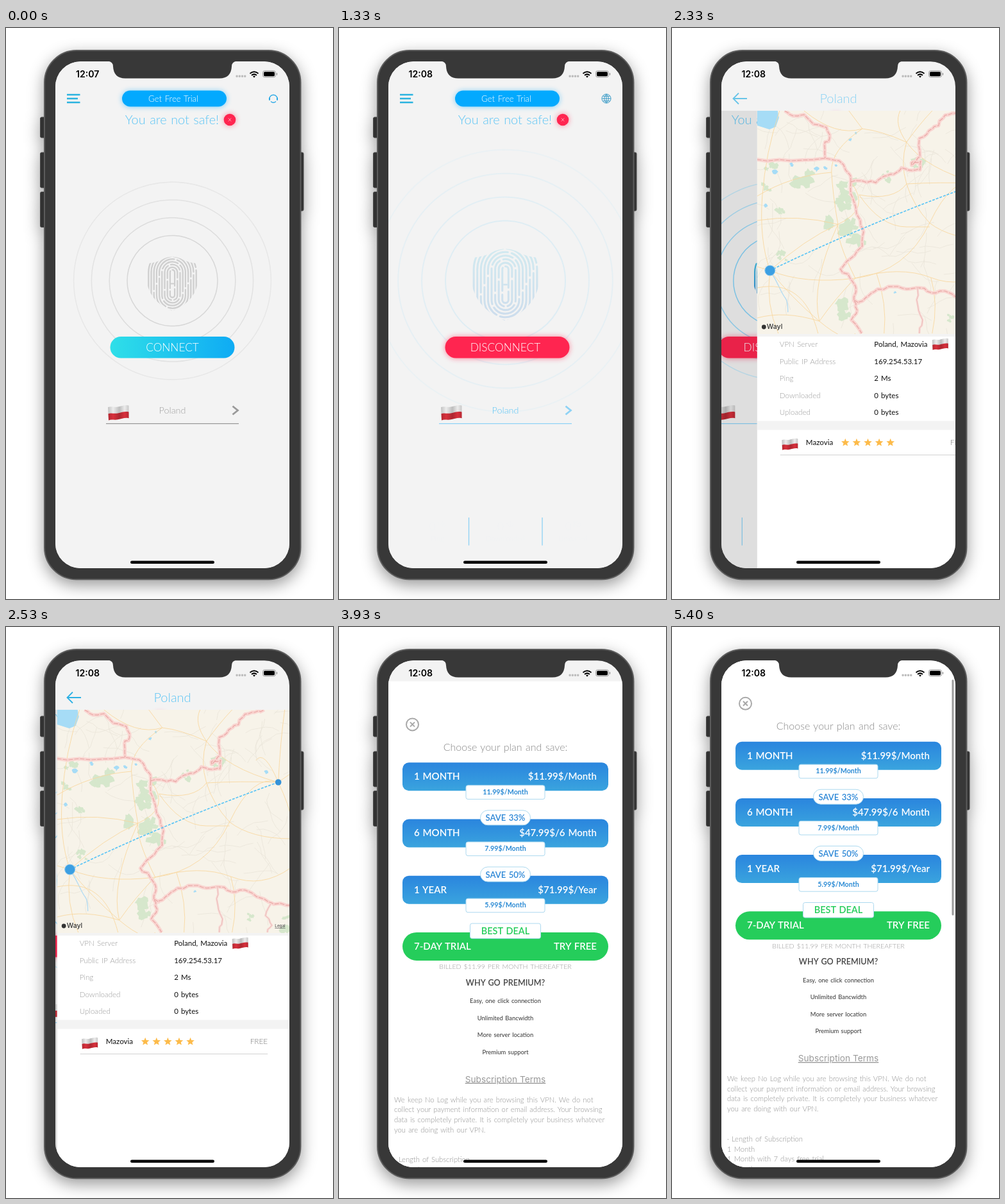
Write an HTML page that moves like this. It is 510x890 px and loops after 5.59 s.

```html
<!DOCTYPE html>
<html lang="en">
<head>
<meta charset="utf-8">
<title>VPN app tour</title>
<style>
html, body { margin: 0; width: 100%; height: 100%; overflow: hidden; background: #fff; }
svg { display: block; width: 510px; height: 890px; font-family: Lato, sans-serif; word-spacing: .07em; }
.ui { font-family: Inter, sans-serif; word-spacing: 0; }
</style>
</head>
<body>
<svg id="stage" viewBox="0 0 510 890"></svg>
<script>
const RED = '#ff2550', SKY = '#5cc5f5', PALE = '#8ed2f5', PAGE = '#f3f3f3';
const LOOP = 5590, STEP = 200 / 3, LAST = 81;

// ---- drawing helpers ----
const rect = (x, y, w, h, r, fill, more = '') =>
  `<rect x="${x}" y="${y}" width="${w}" height="${h}" rx="${r}" fill="${fill}" ${more}/>`;
const circle = (x, y, r, fill, more = '') =>
  `<circle cx="${x}" cy="${y}" r="${r}" fill="${fill}" ${more}/>`;
const line = (d, color, width, more = '') =>
  `<path d="${d}" fill="none" stroke="${color}" stroke-width="${width}" ${more}/>`;
const fillPath = (d, color, more = '') => `<path d="${d}" fill="${color}" ${more}/>`;
const text = (x, y, str, size, color, anchor = 'start', weight = 400, more = '') =>
  `<text x="${x}" y="${y}" font-size="${size}" fill="${color}" text-anchor="${anchor}" font-weight="${weight}" ${more}>${str}</text>`;
const group = (id, body, more = '') => `<g id="${id}" ${more}>${body}</g>`;
const range = n => [...Array(n).keys()];
const grad = (id, a, b, dir) =>
  `<linearGradient id="${id}" x1="0" y1="0" ${dir}><stop stop-color="${a}"/><stop offset="1" stop-color="${b}"/></linearGradient>`;

const CLOTH = 'M0 4C5 2 9 4.500 15 3.500S26 0 32 1.500V21C26 19.500 21 22 15 23S5 22 1 24Z';
const flag = (x, y, w) => `<g transform="translate(${x} ${y}) scale(${w / 32})">` +
  fillPath(CLOTH, '#ececec') +
  fillPath('M.5 14C5 12 9 14.500 15 13.300S26 10 32 11.300V21C26 19.500 21 22 15 23S5 22 1 24Z', '#d8303c') +
  fillPath(CLOTH, 'url(#fold)') + '</g>';

const star = (cx, cy, r) => '<polygon fill="#fdbb4a" points="' + range(10).map(i => {
  const a = i * Math.PI / 5, q = i % 2 ? r * .45 : r;
  return (cx + q * Math.sin(a)).toFixed(1) + ',' + (cy - q * Math.cos(a)).toFixed(1);
}).join(' ') + '"/>';

// ---- home screen ----
function radar(stroke, shades) {
  const rings = shades.map((c, i) => line(
    `M${259.5 - 70.5 - i * 27.8} 394a${70.5 + i * 27.8} ${70.5 + i * 27.8} 0 1 1 0 .01`, c, 1.5)).join('');
  const ridges = range(9).map(i => {
    const w = 3.6 + i * 4.2, h = 21.5 + i * 4.2;
    return rect(259.5 - w, 398.5 - h, w * 2, h * 2, w, 'none',
      `stroke="${stroke}" stroke-width="2.300" stroke-linecap="round" stroke-dasharray="${27 + i * 5} 4.500" stroke-dashoffset="${i * 11}"`);
  }).join('');
  return rings + `<g clip-path="url(#shield)">${ridges}${line('M257 398.500h5', stroke, 2)}</g>`;
}

function pill(x, fill, label, glow) {
  return (glow ? rect(x, 481, 194, 34, 17, fill, 'filter="url(#glow)" opacity=".55"') : '') +
    rect(x, 481, 194, 33.5, 16.7, fill) + text(259.5, 503.5, label, 17.3, '#fff', 'middle', 300);
}

const place = (label, mark) => text(259.5, 601, 'Poland', 14.4, label, 'middle', 300) +
  line('M353.500 589.500L361.500 596L353.500 602.500', mark, 2.8) + line('M156 616.700H363', mark, 1.2);

const stat = (x, unit, label, mid) => text(x, 783, '0', 17.5, SKY, 'start', 300) +
  text(x + 12.5, 777, unit, 10.7, SKY, 'start', 300) + text(mid, 800, label, 11, SKY, 'middle', 300);

const home = rect(77, 52, 365, 790, 0, PAGE) +
  text(259, 149.5, 'You are not safe!', 19.9, SKY, 'middle', 300) +
  circle(349, 143, 9.5, RED, 'filter="url(#glow)" opacity=".5"') + circle(349, 143, 9.3, RED) +
  line('M346.800 140.500l4.400 5m0-5l-4.400 5', '#ffb3c2', .8) +
  group('off', radar('#cfcfcf', ['#d7d7d7', '#dddddd', '#e2e2e2', '#e7e7e7']) +
    pill(162.5, 'url(#aqua)', 'CONNECT') + place('#a0a0a0', '#999')) +
  group('on', group('radar', radar('url(#ink)', ['#86d3f8', '#9adaf8', '#afe1f8', '#c6e9f8'])) +
    pill(165.5, RED, 'DISCONNECT', true) + place(SKY, PALE) +
    line('M202.500 763V806.500M317 763V806.500', PALE, 1.3) +
    group('stats', stat(140.5, 'Ms', 'Ping', 153.5) + stat(247, 'Kb', 'Downloaded', 259.5) + stat(352.5, 'Kb', 'Uploaded', 365))) +
  flag(159, 587, 32.5);

const homeBar = line('M95 104H115.500M95 110H112M95 116H115.500', '#2bb3df', 2.5) +
  rect(181, 98, 163, 25, 12.5, '#03a9fe', 'filter="url(#glow)" opacity=".5"') +
  rect(181, 97.5, 163, 25, 12.5, '#03a9fe') +
  text(261, 115, 'Get Free Trial', 13.2, '#fff', 'middle', 300) +
  group('help', line('M411 112.500a6.300 6.300 0 1 1 12 0M413 114.500q4 3.500 8 0', '#2ba9e6', 1.4) +
    line('M411 108.500v4M423 108.500v4', '#2ba9e6', 2)) +
  group('globe', line('M410 110a7 7 0 1 1 0 .01M410 110h14M417 103v14M411.500 106.300h11M411.500 113.700h11M417 103q-7 7 0 14q7-7 0-14', '#3b9bc6', 1));

// ---- map ----
let seed = 7;
const rnd = () => (seed = seed * 16807 % 2147483647) / 2147483647;

function lanes() {
  let d = '';
  for (let i = 0; i < 110; i++) {
    let x = 77 + rnd() * 365, y = 129 + rnd() * 348, a = rnd() * 6.3;
    d += `M${x.toFixed(0)} ${y.toFixed(0)}`;
    for (let j = 0; j < 5; j++) {
      a += rnd() - .5;
      x += 11 * Math.cos(a); y += 11 * Math.sin(a);
      d += `L${x.toFixed(0)} ${y.toFixed(0)}`;
    }
  }
  return line(d, '#eae5da', .8);
}

function blob(x, y, r, color) {
  const pts = range(11).map(i => {
    const q = r * (.45 + rnd() * .75), a = i * .571;
    return (x + q * 1.15 * Math.cos(a)).toFixed(1) + ',' + (y + q * Math.sin(a)).toFixed(1);
  });
  return `<polygon points="${pts.join(' ')}" fill="${color}"/>`;
}

// a wood is a loose cluster of small patches
const wood = ([x, y, r]) => range(5).map(() =>
  blob(x + (rnd() - .5) * r * 1.7, y + (rnd() - .5) * r * 1.7, r * (.25 + rnd() * .35), '#d6e7cc')).join('');

// adds small wiggles between border points
function wiggle(str) {
  const p = str.split(' ').map(s => s.split(',').map(Number));
  let d = 'M' + p[0];
  for (let i = 1; i < p.length; i++) {
    const [ax, ay] = p[i - 1], [bx, by] = p[i];
    for (let k = 1; k < 3; k++)
      d += `L${(ax + (bx - ax) * k / 3 + rnd() * 4 - 2).toFixed(1)} ${(ay + (by - ay) * k / 3 + rnd() * 4 - 2).toFixed(1)}`;
    d += 'L' + p[i];
  }
  return d;
}

const borders = [
  '77,205 130,207 183,203 205,207 221,228 223,240',
  '120,129 133,137 150,135 165,150 185,155 190,172 182,182 183,203',
  '223,240 240,238 262,241 275,231 290,228 302,218 318,222 331,221 332,208 321,208 318,214 331,200 330,172 345,160 360,152 370,136 385,133 400,129',
  '223,240 226,265 238,300 243,318 241,340 222,360 207,376 222,390 231,405 228,425 233,440 224,455 240,476',
  '228,425 236,427 250,418 265,407 290,403 310,407 330,405 350,413 370,410 400,424 415,432 442,434'
].map(wiggle).join('');
const minor = ['327,405 328,435 335,455 330,476', '410,432 402,450 412,465 405,476'].map(wiggle).join('');

const roads = 'M97 378Q150 330 203 306T223 240M97 378Q150 400 230 390T346 304T422 242M97 378Q130 420 174 457T230 476' +
  'M97 378Q80 330 85 262T112 129M97 378Q90 430 110 476M97 378L77 372M203 306Q195 260 193 225T241 157M241 157Q270 160 310 178' +
  'M310 178Q340 220 422 242M310 178Q300 210 310 243T346 304M310 178Q330 150 350 129M310 178Q290 150 300 129M241 157L220 129M241 157Q200 170 150 129' +
  'M422 242Q400 190 387 208M422 242Q440 280 442 300M422 242Q425 180 432 129M422 242L442 228M230 390Q300 370 348 389T442 375M230 390Q200 330 203 306' +
  'M203 306Q140 290 77 300M193 225Q130 230 77 262M174 457Q200 420 230 390M174 457Q120 440 77 452M236 260Q290 270 310 243M236 260Q270 310 310 310H346' +
  'M346 304Q380 330 442 330M348 389Q360 430 350 476M263 382Q280 430 275 476M174 457Q160 400 203 306M310 243Q360 240 422 242M77 405Q150 390 172 476';

const woods = [[214, 243, 17], [199, 266, 20], [222, 272, 13], [146, 247, 18], [162, 232, 10], [225, 326, 20], [187, 296, 14], [112, 282, 9],
  [99, 218, 9], [92, 246, 8], [211, 440, 16], [228, 306, 11], [432, 462, 14], [330, 213, 10], [117, 355, 9], [282, 230, 9], [380, 452, 6]];
const lakes = [[105, 224, 4], [131, 213, 3], [170, 220, 4], [183, 218, 3], [222, 174, 2.5], [200, 214, 2], [231, 164, 2], [403, 226, 3], [292, 412, 2], [90, 277, 3]];

// x, y of the marker, name, text offset, size
const towns = [[241, 157, 'Kaunas', 2, -1, 8], [309, 177, 'Vilnius', 2, 6, 8], [213, 186, 'Marijampolė', 2, 0, 6.6], [248, 200, 'Alytus', 2, -1, 6.6],
  [193, 225, 'Suwałki', 2, -1, 6.6], [310, 243, 'Lida', 2, 0, 6.6], [387, 207, 'Maladzyechna', 1, -1, 7.2], [418, 239, 'Minsk', 2, -2, 8],
  [236, 261, 'Hrodna', -32, -2, 8], [204, 307, 'Białystok', -41, 7, 8], [311, 310, 'Slonim', 2, -1, 6.6], [346, 306, 'Baranavichy', 2, -1, 7.2],
  [422, 316, 'Slutsk', 2, 5, 6.6], [420, 334, 'Salihorsk', 2, -2, 7.2], [230, 391, 'Brest', 2, 7, 8], [263, 382, 'Kobrin', 2, 5, 6.6],
  [348, 389, 'Pinsk', 2, 6, 7.2], [174, 459, 'Lublin', 2, -2, 8], [220, 468, 'Chełm', 2, -1, 6.6], [97, 376, 'Warsaw', 3, 1, 8]];
const halo = 'paint-order="stroke" stroke="#f9f5ec" stroke-width="1.800"';
const labels = towns.map(([x, y, name, dx, dy, size]) =>
  circle(x, y, 2, '#fff', 'stroke="#555" stroke-width="1"') + text(x + dx, y + dy, name, size, '#444', 'start', 500, halo)).join('') +
  text(79, 177, 'KALININGRAD', 8.3, '#777', 'start', 500, 'letter-spacing="1.100" ' + halo) +
  text(412, 284, 'BELARUS', 9, '#444', 'start', 600, 'letter-spacing="2" ' + halo) +
  text(74, 259, 'Olsztyn', 7.8, '#555', 'start', 500, halo) +
  circle(184, 272, 4.5, '#35a05a') + circle(184, 272, 1.6, '#fff') +
  text(184, 283, 'Biebrza', 6.3, '#35a05a', 'middle', 500, halo) + text(184, 290, 'National Park', 6.3, '#35a05a', 'middle', 500, halo);

const map = rect(77, 129, 365, 348, 0, '#f7f3e9') + lanes() +
  woods.map(wood).join('') + lakes.map(g => blob(...g, '#a6dcf6')).join('') +
  fillPath('M77 129H109L111 140L106 154L96 158L77 152Z', '#a6dcf6') +
  line('M97 378q8 12 14 25t10 18t4 22', '#b5dcf2', 1.4) +
  line(roads, '#f9d9a2', .9) +
  line(borders, '#f9d5d1', 5.5, 'stroke-linejoin="round"') + line(borders, '#e8a5a2', 1.1, 'stroke-dasharray="7 2"') +
  line(minor, '#f9dcd8', 3.5) + line(minor, '#e5b0ac', .8) +
  group('labels', labels, 'class="ui"') +
  line('M97 378Q255 302 422 242', SKY, 1.7, 'stroke-dasharray="4 2"') +
  circle(97, 378, 8, '#3b9fe2', 'stroke="#8cc8ee" stroke-width="1"') + circle(422, 242, 4.8, '#3492d8') +
  circle(87.5, 466, 3.4, '#333') +
  text(92, 469, 'Wayl', 10.5, '#333', 'start', 500, 'class="ui"') +
  text(433, 468, 'Legal', 6.3, '#555', 'end', 500, 'class="ui" text-decoration="underline"');

const facts = [['VPN Server', 'Poland, Mazovia'], ['Public IP Address', '169.254.53.17'], ['Ping', '2 Ms'], ['Downloaded', '0 bytes'], ['Uploaded', '0 bytes']];
const server = rect(77, 129, 365, 713, 0, '#fff') + `<g clip-path="url(#mapBox)">${map}</g>` +
  rect(77, 477, 365, 4, 0, PAGE) + rect(77, 612.5, 365, 14, 0, PAGE) +
  facts.map(([k, v], i) => text(112, 497.3 + i * 26.5, k, 11.6, '#9a9a9a', 'start', 300) + text(259.5, 497.3 + i * 26.5, v, 11.5, '#111')).join('') +
  flag(350, 483, 25) + flag(115.5, 639, 25) +
  text(153, 650, 'Mazovia', 11.6, '#111') + range(5).map(i => star(214.5 + i * 17.6, 646.3, 6.6)).join('') +
  text(405.5, 650, 'FREE', 11.8, '#777', 'end', 300) + line('M113 665.500H405.500', '#d2d2d2', 1);
const serverBar = line('M117 110H95.500M104 101.500L95.500 110L104 118.500', '#2ab0e4', 1.8) +
  text(259.5, 117, 'Poland', 20, SKY, 'middle', 300);

// ---- plans ----
const box = (x, y, w, h, r) => rect(x, y, w, h, r, '#fff', 'stroke="#acd9ef" stroke-width="1"');
const mid = (y, str, size, color, weight = 400) => text(259.5, y, str, size, color, 'middle', weight);
const ends = (y, a, b) => text(117, y, a, 15, '#fff', 'start', 600) + text(402, y, b, 15, '#fff', 'end', 600);
const plans = [['1 MONTH', '$11.99$/Month', '11.99$/Month'], ['6 MONTH', '$47.99$/6 Month', '7.99$/Month', 'SAVE 33%'], ['1 YEAR', '$71.99$/Year', '5.99$/Month', 'SAVE 50%']];
const plan = ([name, price, rate, save], i) => {
  const y = 178.7 + i * 88.2;
  return rect(99, y, 321, 44, 10, 'url(#deep)') + ends(y + 27, name, price) +
    box(198, y + 35.5, 123, 21.6, 3) + mid(y + 49.7, rate, 10.7, '#2a8ad4', 700) +
    (save ? box(220.5, y - 13.7, 78, 23, 11.5) + mid(y + 2.9, save, 13.1, '#2a86d6', 600) : '');
};
const prose = ['We keep No Log while you are browsing this VPN. We do not', 'collect your payment information or email address. Your browsing',
  'data is completely private. It is completely your business whatever', 'you are doing with our VPN.', '', '',
  '· Length of Subscription', '1 Month', '1 Month with 7 days free trial', '6 Month'];
const offer = rect(77, 52, 365, 800, 0, '#fff') +
  circle(114.5, 119.3, 9.5, 'none', 'stroke="#a8a8a8" stroke-width="2"') + line('M111 115.800l7 7m0-7l-7 7', '#a8a8a8', 2) +
  mid(160, 'Choose your plan and save:', 16, '#888', 300) + plans.map(plan).join('') +
  rect(99, 443.3, 321, 44, 22, '#25cd5b') + ends(470, '7-DAY TRIAL', 'TRY FREE') +
  box(204.5, 429.5, 110, 23.5, 3) + mid(446, 'BEST DEAL', 14.5, '#25cd5b', 600) +
  mid(500.8, 'BILLED $11.99 PER MONTH THEREAFTER', 10.6, '#999', 300) + mid(526, 'WHY GO PREMIUM?', 12.6, '#444', 600) +
  ['Easy, one click connection', 'Unlimited Bancwidth', 'More server location', 'Premium support'].map((s, i) => mid(553.8 + i * 26.5, s, 9.4, '#333')).join('') +
  text(259.5, 677, 'Subscription Terms', 13.7, '#999', 'middle', 400, 'class="ui" text-decoration="underline"') +
  prose.map((s, i) => text(86, 708 + i * 15.65, s, 11.25, '#909090', 'start', 300)).join('');

// ---- phone ----
const status = text(127.3, 77, '', 14.1, '#000', 'middle', 600, 'class="ui" id="clock"') +
  range(4).map(i => rect(358.5 + i * 4.2, 73.5, 3.2, 3.2, 1, '#bbb')).join('') +
  line('M380.500 71q6.500-5.500 13 0M383 73.700q4-3.200 8 0', '#000', 2) + fillPath('M385 75.200q2-1.500 4 0l-2 2.300Z', '#000') +
  rect(400.5, 66.7, 20, 10, 3, 'none', 'stroke="#999" stroke-width="1"') + rect(402, 68.2, 17, 7, 1.6, '#000') + rect(421.8, 70, 1.4, 3.6, .7, '#999');
const keys = [[53.5, 139, 32], [53.5, 194, 55], [53.5, 255.5, 55], [456, 194, 91]]
  .map(([x, y, h]) => rect(x, y, 8, h, 2, '#303030', 'stroke="#4c4c4c" stroke-width="1"')).join('');
const notch = fillPath('M159 51.500Q167 52.500 167 60Q168 78.500 186 78.500H333Q351 78.500 352 60Q352 52.500 360 51.500Z', '#383838');

const stage = document.getElementById('stage');
stage.innerHTML = '<defs>' +
  grad('aqua', '#2fdfe8', '#0fabf4', 'x2="1" y2="0"') + grad('deep', '#2a85de', '#3aa4de', 'x2="0" y2="1"') +
  '<linearGradient id="ink" gradientUnits="userSpaceOnUse" x1="0" y1="357" x2="0" y2="440"><stop stop-color="#45c4e4"/><stop offset="1" stop-color="#2b7fd2"/></linearGradient>' +
  '<linearGradient id="fold"><stop stop-opacity=".18"/><stop offset=".25" stop-opacity="0"/><stop offset=".55" stop-opacity=".2"/><stop offset=".8" stop-opacity="0"/><stop offset="1" stop-opacity=".15"/></linearGradient>' +
  '<filter id="glow" x="-50%" y="-100%" width="200%" height="300%"><feGaussianBlur stdDeviation="4"/></filter>' +
  '<filter id="drop" x="-20%" y="-10%" width="140%" height="125%"><feDropShadow dx="0" dy="8" stdDeviation="12" flood-opacity=".4"/></filter>' +
  '<clipPath id="screen"><rect x="77" y="52.300" width="365" height="789.700" rx="39"/></clipPath>' +
  '<clipPath id="mapBox"><rect x="77" y="129" width="365" height="348"/></clipPath>' +
  '<clipPath id="shield"><path d="M219 367Q236 366 247 359Q259.500 354 272 359Q283 366 300 367V388Q299 425 259.500 441Q220 425 219 388Z"/></clipPath></defs>' +
  `<g filter="url(#drop)">${keys}${rect(60, 35, 399.5, 824.5, 50, '#383838', 'stroke="#5c5c5c" stroke-width="2"')}</g>` +
  '<g clip-path="url(#screen)">' + rect(77, 52, 365, 790, 0, PAGE) +
  group('home', home) + rect(77, 129, 365, 713, 0, '#000', 'id="dim"') + group('server', server) +
  group('homeBar', homeBar) + group('serverBar', serverBar) +
  group('offer', offer) + rect(436.5, 82, 3, 367.500, 1.5, '#9b9b9b', 'id="thumb"') +
  status + rect(194, 830.4, 131, 4.6, 2.3, '#000') + '</g>' + notch;

// ---- motion ----
const el = Object.fromEntries([...stage.querySelectorAll('[id]')].map(n => [n.id, n]));
const fade = (id, v) => el[id].setAttribute('opacity', v);
const move = (id, x, y) => el[id].setAttribute('transform', `translate(${x} ${y})`);
const ramp = (t, a, b) => Math.min(1, Math.max(0, (t - a) / (b - a)));
// distance left on a critically damped spring, 1 down to 0
const spring = (t, start) => {
  const u = Math.max(0, t - start) * .01826;
  return (1 + u) * Math.exp(-u);
};

function draw(t) {
  const on = t >= 660;
  const push = spring(t, 2150), rise = spring(t, 3660);
  el.clock.textContent = on ? '12:08' : '12:07';
  fade('off', on ? 0 : 1); fade('on', on ? 1 : 0);
  fade('help', on ? 0 : 1); fade('globe', on ? 1 : 0);

  const p = ramp(t, 1260, 1660), scale = 1 + .6 * (1 - p) ** 3;
  fade('radar', p);
  el.radar.setAttribute('transform', `translate(259.5 394) scale(${scale}) translate(-259.5 -394)`);
  fade('stats', ramp(t, 1330, 1600));

  move('home', -110 * (1 - push), 0);
  fade('dim', .1 * (1 - push));
  move('server', 365 * push, 0);
  fade('homeBar', Math.max(0, 2 * push - 1));
  fade('serverBar', Math.max(0, 1 - 2 * push));
  fade('labels', ramp(t, 2660, 2870));

  move('offer', 0, 800 * rise);
  fade('thumb', ramp(t, 4260, 4400));
}

const start = performance.now();
function tick() {
  const t = (performance.now() - start) % LOOP;
  draw(Math.min(LAST, Math.floor(t / STEP + .05)) * STEP);
  requestAnimationFrame(tick);
}
tick();
</script>
</body>
</html>
```
